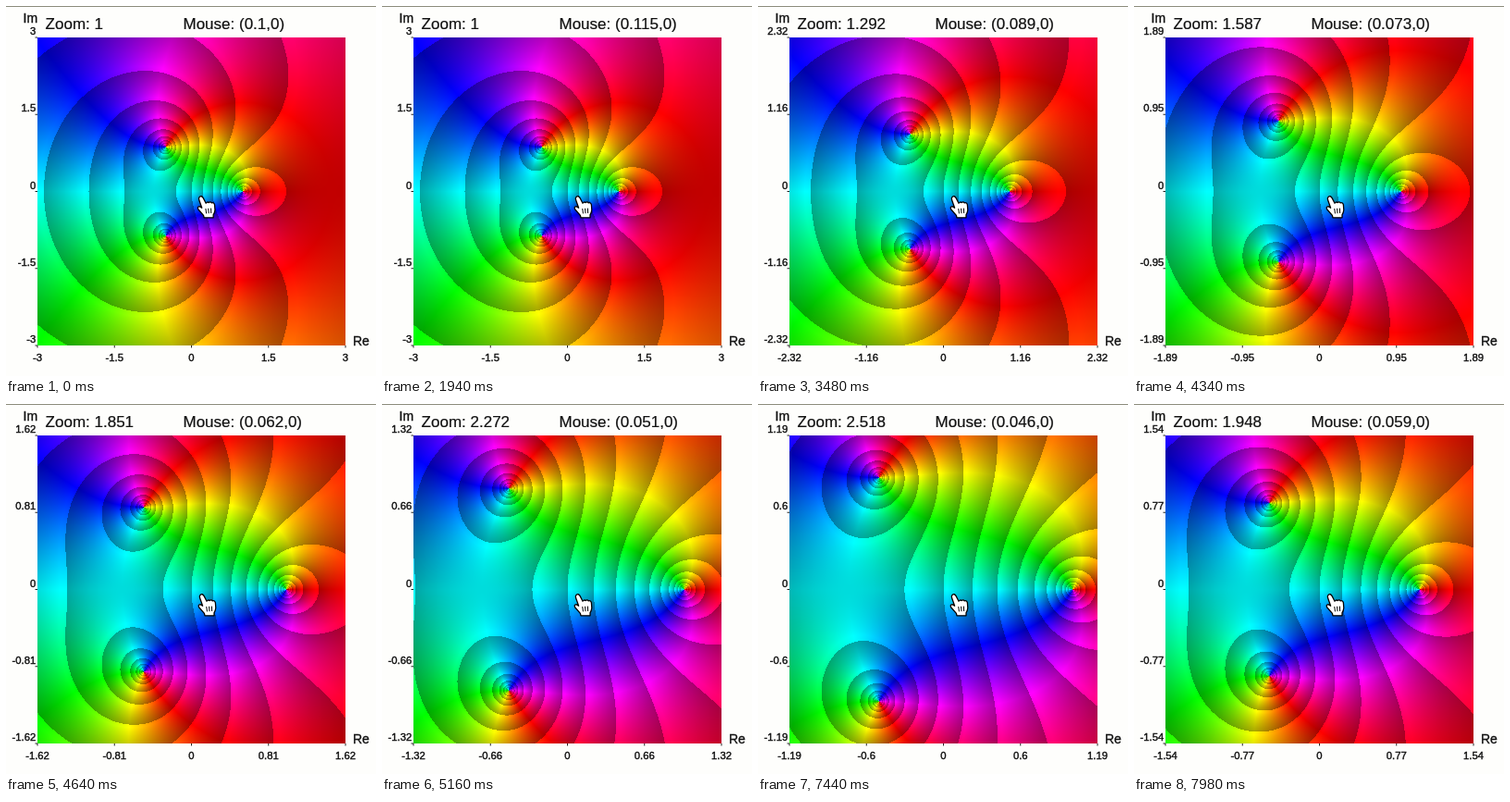
Write an HTML page with a canvas that moves like this. It is 400 px wide and 400 px high and loops after 8000 ms.

```html
<!DOCTYPE html>
<html lang="en">
<head>
<meta charset="utf-8">
<title>Domain coloring</title>
<style>
  html, body { margin: 0; width: 100%; height: 100%; overflow: hidden; background: #fefefc; }
  #stage { position: relative; width: 400px; height: 400px; overflow: hidden; }
  canvas { position: absolute; left: 34px; top: 34px; filter: blur(.35px); }
  svg { position: absolute; left: 0; top: 0; }
  text { font-family: "Liberation Sans", Arial, sans-serif; fill: #111; stroke: #111; }
  .head { font-size: 17px; stroke-width: .2px; }
  .axis { font-size: 14px; stroke-width: .35px; }
  .tick { font-size: 11.3px; stroke-width: .4px; }
</style>
</head>
<body>
<div id="stage">
  <canvas id="plot" width="333" height="333"></canvas>
  <svg width="400" height="400" viewBox="0 0 400 400">
    <rect width="400" height="1" fill="#8c8c7c"/>
    <text class="head" id="zoom" x="42.6" y="25.4"></text>
    <text class="head" id="mouse" x="191.5" y="25.4"></text>
    <text class="axis" x="18.5" y="17.6">Im</text>
    <text class="axis" x="375" y="366.6">Re</text>
    <g id="ticks"></g>
    <g id="hand" stroke="#000" stroke-linejoin="round" stroke-linecap="round">
      <path fill="#fff" stroke-width="1.3" d="M210 206.4Q212.4 204.6 214 207.4L217 213.2Q218.4 211.2 220 212.6Q221.8 211 223.2 212.8Q225.8 212 226.4 215L226.8 220.5Q226.4 223.8 225 225.6V228.8H215L214.4 226.4L208.6 219.8Q207.4 216.8 210 216.6L212.6 218.2L209.6 209.8Q208.8 207.6 210 206.4Z"/>
      <path fill="none" d="M216.8 219.4l.6 4.6M219.6 219.2l.4 4.6M222.4 219l.2 4.6"/>
    </g>
  </svg>
</div>
<script>
const LOOP = 8000, SIZE = 333, HALF = SIZE / 2, MID = 200.5, RANGE = 3;
const byId = id => document.getElementById(id);
const ctx = byId('plot').getContext('2d');
const image = ctx.createImageData(SIZE, SIZE);
const round = (v, digits) => String(Number(v.toFixed(digits)));

// [time, number of wheel notches]; each notch zooms by 1 / 0.95
const wheel = [[0, 0], [2480, 0], [2500, .5], [3480, 5], [4340, 9], [5160, 16],
               [5420, 18], [7500, 18], [7980, 13], [8000, 13]];

function notchesAt(t) {
  const i = wheel.findIndex(p => p[0] > t);
  const [t0, a] = wheel[i - 1], [t1, b] = wheel[i];
  return Math.round(a + (b - a) * (t - t0) / (t1 - t0));
}

function makeTicks() {
  const add = (name, attrs) => {
    const el = document.createElementNS('http://www.w3.org/2000/svg', name);
    for (const key in attrs) el.setAttribute(key, attrs[key]);
    return byId('ticks').appendChild(el);
  };
  return [-1, -.5, 0, .5, 1].map(part => {
    const x = MID + part * HALF, y = MID - part * HALF;
    add('path', { d: `M31.5 ${y}h2.5M${x} 367v2.5`, stroke: '#222' });
    return {
      part,
      labels: [
        add('text', { class: 'tick', x, y: 383.6, 'text-anchor': 'middle' }),
        add('text', { class: 'tick', x: 32.3, y: y - 3, 'text-anchor': 'end' })
      ]
    };
  });
}
const ticks = makeTicks();

// Phase portrait of (z - 1) / (z² + z + 1) with modulus contours
function drawPlot(zoom) {
  const data = image.data, unit = RANGE / zoom / HALF;
  const channel = (hue, shift) =>
    Math.min(1, Math.max(0, Math.abs((hue + shift) % 6 - 3) - 1));
  let p = 0;
  for (let j = 0; j < SIZE; j++) {
    const y = (HALF - j - .5) * unit;
    for (let i = 0; i < SIZE; i++) {
      const x = (i + .5 - HALF) * unit;
      const nr = x - 1, dr = x * x - y * y + x + 1, di = 2 * x * y + y;
      const re = nr * dr + y * di, im = y * dr - nr * di;
      const hue = (Math.atan2(im, re) / Math.PI * 3 + 6) % 6;
      const level = Math.log((nr * nr + y * y) / (dr * dr + di * di));
      const light = 255 * Math.min(1, .655 + .39 * (level - Math.floor(level)));
      data[p++] = light * channel(hue, 0);
      data[p++] = light * channel(hue, 4);
      data[p++] = light * channel(hue, 2);
      data[p++] = 255;
    }
  }
  ctx.putImageData(image, 0, 0);
}

let shownNotches = -1, shownMouse = -1;

function render() {
  const t = performance.now() % LOOP;
  const notches = notchesAt(t), mouse = t < 1200 ? .1 : .1152;
  if (notches !== shownNotches || mouse !== shownMouse) {
    const zoom = Math.pow(.95, -notches);
    if (notches !== shownNotches) {
      drawPlot(zoom);
      byId('zoom').textContent = 'Zoom: ' + round(zoom, 3);
      for (const { part, labels } of ticks)
        for (const label of labels) label.textContent = round(part * RANGE / zoom, 2);
    }
    byId('mouse').textContent = `Mouse: (${round(mouse / zoom, 3)},0)`;
    byId('hand').setAttribute('transform', `translate(${(mouse - .1152) * HALF / RANGE} 0)`);
    shownNotches = notches;
    shownMouse = mouse;
  }
  requestAnimationFrame(render);
}
render();
</script>
</body>
</html>
```
